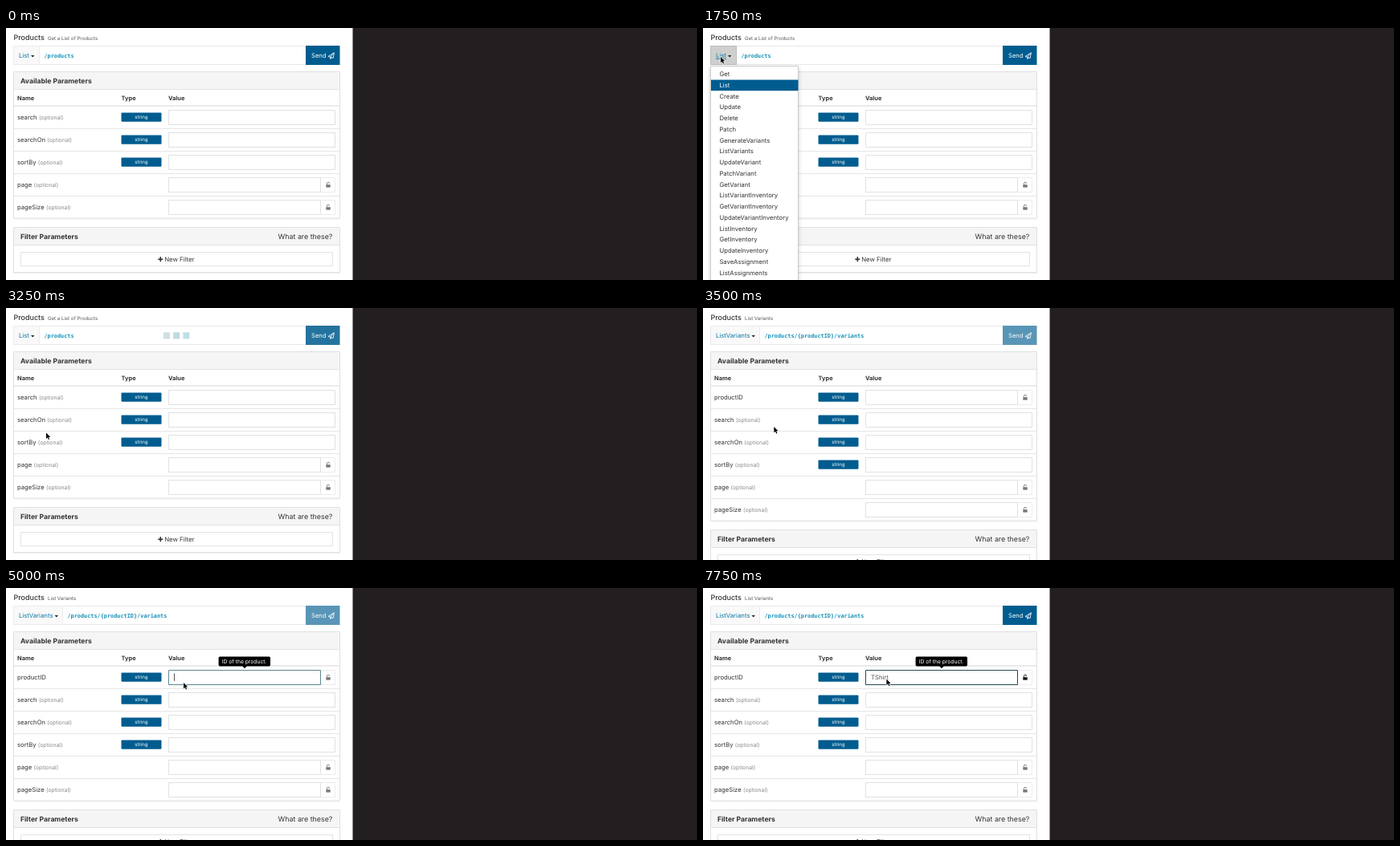
Recreate the animation shown at these times as an HTML page with a canvas. Size 860 px wide and 314 px high, loop 8 s.

```html
<!DOCTYPE html>
<html lang="en">
<head>
<meta charset="utf-8">
<title>API console</title>
<style>
  html, body { margin: 0; width: 860px; height: 314px; overflow: hidden; background: #fff; }
  canvas { display: block; width: 860px; height: 314px; }
</style>
</head>
<body>
<canvas id="stage"></canvas>
<script>
const W = 860, H = 314, LOOP = 8000, TICK = 250;
const BLUE = '#005c8f', INK = '#333', LINE = '#e3e3e3';
const SANS = 'Inter, "Open Sans", sans-serif';
const MONO = '"DejaVu Sans Mono", "Liberation Mono", monospace';

const canvas = document.getElementById('stage');
const ctx = canvas.getContext('2d');
const dpr = window.devicePixelRatio || 1;
canvas.width = W * dpr;
canvas.height = H * dpr;

const methods = ['Get', 'List', 'Create', 'Update', 'Delete', 'Patch', 'GenerateVariants',
  'ListVariants', 'UpdateVariant', 'PatchVariant', 'GetVariant', 'ListVariantInventory',
  'GetVariantInventory', 'UpdateVariantInventory', 'ListInventory', 'GetInventory',
  'UpdateInventory', 'SaveAssignment', 'ListAssignments'];

const listParams = [
  { name: 'search', type: 'string' },
  { name: 'searchOn', type: 'string' },
  { name: 'sortBy', type: 'string' },
  { name: 'page', lock: true },
  { name: 'pageSize', lock: true }
];
const views = {
  list: { method: 'List', title: 'Get a List of Products', url: '/products', params: listParams },
  variants: {
    method: 'ListVariants', title: 'List Variants', url: '/products/{productID}/variants',
    params: [{ name: 'productID', type: 'string', lock: true, required: true }, ...listParams]
  }
};

// Pointer path: time, x, y
const path = [
  [1000, 66, 128], [1250, 36, 70], [1500, 22, 36], [2000, 22, 36], [2250, 30, 66],
  [2500, 44, 122], [2750, 50, 155.5], [3250, 50, 155.5], [4250, 203.3, 125],
  [4500, 211, 123], [5000, 221, 118], [7250, 221, 118], [7500, 228.4, 113.5], [8000, 228.4, 113.5]
];

function pointerAt(t) {
  if (t < path[0][0]) return null;
  const i = path.findIndex(p => p[0] > t);
  const [t0, x0, y0] = path[i - 1], [t1, x1, y1] = path[i];
  const k = (t - t0) / (t1 - t0);
  return { x: x0 + (x1 - x0) * k, y: y0 + (y1 - y0) * k };
}

function typedAt(t) {
  if (t < 5500) return '';
  if (t < 6000) return 'T';
  if (t < 6500) return 'TS';
  if (t < 6750) return 'TSh';
  return t < 7000 ? 'TShir' : 'TShirt';
}

function sendAlpha(t) {
  if (t < 3250) return 1;
  if (t < 3500) return 0.86;
  if (t < 5500) return 0.65;
  return t < 5750 ? 0.86 : 1;
}

function fill(x, y, w, h, color) {
  ctx.fillStyle = color;
  ctx.fillRect(x, y, w, h);
}

function frame(x, y, w, h, color = LINE, bg = '#fff') {
  fill(x, y, w, h, bg);
  ctx.strokeStyle = color;
  ctx.lineWidth = 1;
  ctx.strokeRect(x + 0.5, y + 0.5, w - 1, h - 1);
}

function poly(points, color) {
  ctx.beginPath();
  points.forEach(p => ctx.lineTo(p[0], p[1]));
  ctx.closePath();
  ctx.fillStyle = color;
  ctx.fill();
}

// Draws text and returns its right edge
function text(str, x, y, size, color = INK, weight = 400, family = SANS) {
  ctx.font = `${weight} ${size}px ${family}`;
  ctx.fillStyle = color;
  ctx.fillText(str, x, y);
  return x + ctx.measureText(str).width;
}

function padlock(x, y, color) {
  fill(x, y, 5.4, 3.4, color);
  ctx.strokeStyle = color;
  ctx.lineWidth = 0.9;
  ctx.beginPath();
  ctx.moveTo(x + 1.1, y);
  ctx.lineTo(x + 1.1, y - 1.3);
  ctx.arc(x + 2.7, y - 1.4, 1.6, Math.PI, 0);
  ctx.stroke();
}

function plane(x, y) {
  ctx.strokeStyle = '#fff';
  ctx.lineWidth = 0.85;
  ctx.lineJoin = 'round';
  ctx.beginPath();
  ctx.moveTo(x, y + 4.6);
  ctx.lineTo(x + 7.4, y);
  ctx.lineTo(x + 6.1, y + 6.8);
  ctx.lineTo(x + 3.3, y + 5.6);
  ctx.closePath();
  ctx.moveTo(x + 7.2, y + 0.2);
  ctx.lineTo(x + 2.7, y + 5.4);
  ctx.lineTo(x + 2.8, y + 7.8);
  ctx.lineTo(x + 4.3, y + 6.1);
  ctx.stroke();
}

function pointer({ x, y }) {
  const shape = [[0, 0], [0, 7.4], [1.7, 5.8], [2.9, 8.5], [4.1, 8], [2.9, 5.4], [5.2, 5.3]]
    .map(p => [x + p[0], y + p[1]]);
  ctx.beginPath();
  shape.forEach(p => ctx.lineTo(p[0], p[1]));
  ctx.closePath();
  ctx.strokeStyle = '#fff';
  ctx.lineWidth = 1.2;
  ctx.stroke();
  poly(shape, '#000');
}

function requestBar(view, t, open, hover) {
  const labelEnd = view.method === 'List' ? 42 : 71;
  frame(9, 22, 407, 24, '#e8e8e8');
  frame(9, 22, labelEnd - 9, 24, open ? '#bcbcbc' : '#ececec', open ? '#cfcfcf' : '#f9f9f9');
  const end = text(view.method, 16, 37.4, 7.75, '#0878a4');
  if (hover) fill(16, 38.2, end - 16, 0.8, '#0878a4');
  const cx = end + 2.1;
  poly([[cx, 34], [cx + 4.4, 34], [cx + 2.2, 36.4]], '#222');
  text(view.url, labelEnd + 5.4, 37.2, 6.87, '#1692b8', 700, MONO);

  if (t >= 3250 && t < 3500) {
    ['#cfdee7', '#bfd9e3', '#bfe0e6'].forEach((c, i) => fill(196 + i * 12.2, 30.3, 8, 8.2, c));
  }

  fill(373, 22, 43, 24, '#fff');
  ctx.globalAlpha = sendAlpha(t);
  fill(373, 22, 42.5, 24, BLUE);
  ctx.globalAlpha = 1;
  text('Send', 380, 37.4, 7.65, '#fff');
  plane(401, 30.8);
}

function panel(y, h, title) {
  fill(9, y + h, 407, 1, '#eee');
  frame(9, y, 407, h, '#e0e0e0');
  fill(10, y + 1, 405, 22, '#f5f5f5');
  fill(10, y + 22, 405, 1, '#e2e2e2');
  text(title, 18, y + 14.8, 8.6, INK, 700);
}

function field(p, y, t) {
  const end = text(p.name, 14, y + 2.9, 7.7);
  if (!p.required) text('(optional)', end + 2.3, y + 2.9, 6.8, '#888');
  if (p.type) {
    ctx.beginPath();
    ctx.roundRect(143.5, y - 5.6, 50, 11.4, 1.2);
    ctx.fillStyle = BLUE;
    ctx.fill();
    text(p.type, 160.2, y + 1.6, 6.1, '#fff');
  }
  if (p.lock) frame(391, y - 9, 19, 19, '#ececec');
  const focused = p.required && t >= 4750;
  const edge = !focused ? '#dfe1e3' : t < 5500 ? '#5f8790' : '#234b50';
  frame(202, y - 9, p.lock ? 190 : 208, 19, edge);
  if (p.lock) padlock(398.3, y + 0.2, p.required && t >= 5500 ? '#111' : '#777');
  if (!p.required) return;
  const value = typedAt(t);
  const caretX = text(value, 209, y + 2.9, 7.7, '#555');
  const blinkOn = t === 5000 || (t >= 5750 && t < 6750);
  if (blinkOn) fill(caretX + 0.2, y - 4.6, 0.8, 9.4, '#222');
}

function paramPanel(params, t) {
  const rows = params.length;
  panel(54, 43.5 + rows * 28, 'Available Parameters');
  text('Name', 14, 89.8, 7.4, INK, 700);
  text('Type', 143.6, 89.8, 7.4, INK, 700);
  text('Value', 202, 89.8, 7.4, INK, 700);
  fill(10, 96.4, 405, 1.2, '#ddd');
  params.forEach((p, i) => {
    const y = 111 + i * 28;
    if (i) fill(10, y - 14, 405, 1, '#e6e6e6');
    field(p, y, t);
  });
}

function filterPanel(y) {
  panel(y, 57, 'Filter Parameters');
  text('What are these?', 338.6, y + 14.8, 8.85);
  frame(18, y + 31, 389, 18, '#e3e3e3');
  fill(189.3, y + 39.3, 6, 1.6, INK);
  fill(191.5, y + 37.1, 1.6, 6, INK);
  text('New Filter', 197.2, y + 42.9, 7.8);
}

function menu(tip) {
  ctx.save();
  ctx.shadowColor = 'rgba(0,0,0,.2)';
  ctx.shadowBlur = 5 * dpr;
  ctx.shadowOffsetY = 2 * dpr;
  fill(9, 47, 110, 300, '#fff');
  ctx.restore();
  frame(9, 47, 110, 300, '#ccc');
  methods.forEach((name, i) => {
    const y = 57.5 + i * 13.75;
    const active = name === 'List';
    const over = tip.x < 119 && Math.abs(tip.y - y) < 6.87;
    if (active || over) fill(10, y - 6.7, 108.5, 13.6, active ? BLUE : '#f5f5f5');
    text(name, 20.4, y + 2.7, 7.75, active ? '#fff' : INK);
  });
}

function tooltip() {
  ctx.beginPath();
  ctx.roundRect(264.6, 85.4, 64.4, 12, 1.6);
  ctx.fillStyle = '#000';
  ctx.fill();
  poly([[294, 97], [300, 97], [297, 100.2]], '#000');
  text('ID of the product.', 268.6, 94, 6.78, '#fff');
}

function draw(time) {
  const t = Math.floor((time % LOOP) / TICK) * TICK;
  const view = t < 3500 ? views.list : views.variants;
  const open = t >= 1750 && t < 3250;
  const tip = pointerAt(t);

  ctx.setTransform(dpr, 0, 0, dpr, 0, 0);
  ctx.textRendering = 'geometricPrecision';
  fill(0, 0, W, H, '#fff');
  fill(431.5, 0, W - 431.5, H, '#231f20');

  text('Products', 9.4, 15, 9, INK, 500);
  text(view.title, 52, 15, 6.1, '#555');
  requestBar(view, t, open, t >= 1500 && t < 2250);
  paramPanel(view.params, t);
  filterPanel(108 + view.params.length * 28);

  if (open) menu(tip);
  if (t >= 4750) tooltip();
  if (tip) pointer(tip);
}

const start = performance.now();
function loop() {
  draw(Math.max(0, performance.now() - start));
  requestAnimationFrame(loop);
}
loop();
</script>
</body>
</html>
```
